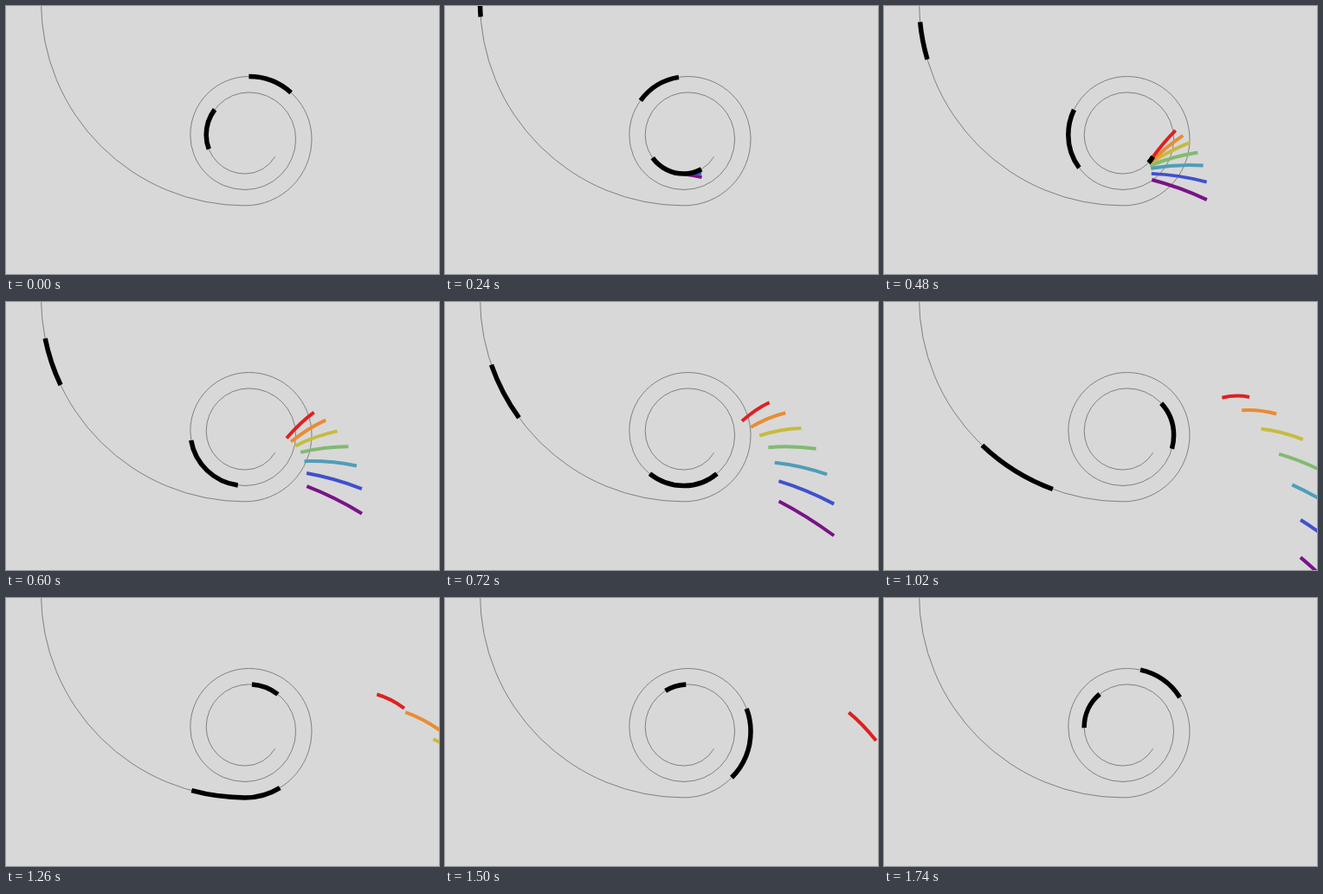
An HTML page with a canvas for the animation above (1800 ms loop, 500 px wide and 310 px high).

```html
<!DOCTYPE html>
<html lang="en">
<head>
<meta charset="utf-8">
<title>Spiral run</title>
<style>
  html, body { margin: 0; width: 100%; height: 100%; overflow: hidden; background: #d8d8d8; }
  canvas { display: block; }
</style>
</head>
<body>
<canvas width="500" height="310"></canvas>
<script>
const ctx = document.querySelector('canvas').getContext('2d');
const LOOP = 1800, TRAIL = 200, QUARTER = Math.PI / 2, GRAVITY = 0.000174;

// Quarter arcs: one wide entry curve, then a spiral turning round a small square
const arcs = [{ x: 276, y: -4.6, r: 235.5 }];
for (let i = 0; i < 9; i++) {
  arcs.push({
    x: [276, 280.6, 280.6, 276][i % 4],
    y: [153.9, 153.9, 149.3, 149.3][i % 4],
    r: 77 - 4.6 * i
  });
}
let total = 0;
for (const arc of arcs) {
  arc.from = total;
  total += arc.r * QUARTER;
}
const END = arcs[9].from + 41.8;

// Time and distance along the track
const knots = [
  [0, 0], [240, 17], [480, 67], [720, 147.5], [1020, 286.6], [1260, 411.8],
  [1540, 531.7], [1800, 604.5], [2040, 668], [2280, 751.2], [2520, 851.3],
  [2820, 942.6], [3060, 983.7], [3340, 1021.2], [3600, 1081.2], [3840, 1155.9],
  [3910, 1177]
];
const rise = i => (knots[i + 1][1] - knots[i][1]) / (knots[i + 1][0] - knots[i][0]);
const slopes = knots.map(([t], i) => {
  if (i === 0) return 0;
  if (i === knots.length - 1) return rise(i - 1);
  const before = t - knots[i - 1][0], after = knots[i + 1][0] - t;
  return (rise(i - 1) * after + rise(i) * before) / (before + after);
});

function distance(t) {
  if (t <= 0) return 0;
  const i = knots.findIndex(k => k[0] > t) - 1;
  if (i < 0) return END;
  const [t0, s0] = knots[i], [t1, s1] = knots[i + 1];
  const h = t1 - t0, u = (t - t0) / h, v = 1 - u;
  return s0 * v * v * (1 + 2 * u) + s1 * u * u * (3 - 2 * u)
    + h * u * v * (slopes[i] * v - slopes[i + 1] * u);
}

function strokeTrack(from, to, color, width) {
  to = Math.min(to, END);
  if (to <= from) return;
  ctx.beginPath();
  arcs.forEach(({ x, y, r, from: start }, i) => {
    const a = Math.max(from - start, 0), b = Math.min(to - start, r * QUARTER);
    const angle = Math.PI - i * QUARTER;
    if (b > a) ctx.arc(x, y, r, angle - a / r, angle - b / r, true);
  });
  stroke(color, width);
}

function stroke(color, width) {
  ctx.strokeStyle = color;
  ctx.lineWidth = width;
  ctx.stroke();
}

// Colour, launch time, then position and velocity at 480 ms
const sparks = [
  ['#781487', 178, 372.5, 224, 0.318, 0.15],
  ['#4050cf', 210, 372.3, 203.5, 0.319, 0.083],
  ['#509db8', 240, 368.3, 184.6, 0.302, 0.019],
  ['#82ba70', 255, 362, 169.6, 0.276, -0.041],
  ['#c6bb40', 290, 353.3, 158, 0.241, -0.092],
  ['#e98c33', 290, 345, 150, 0.2, -0.132],
  ['#df2020', 300, 336.5, 144, 0.158, -0.157]
];

function drawSpark([color, launch, x, y, vx, vy], t) {
  const from = Math.max(t - TRAIL, launch) - 480, to = t - 480;
  if (to <= from) return;
  const at = d => [x + vx * d, y + vy * d + GRAVITY * d * d];
  const mid = (from + to) / 2;
  ctx.beginPath();
  ctx.moveTo(...at(from));
  // Control point where the two end tangents meet
  ctx.quadraticCurveTo(x + vx * mid, y + vy * mid + GRAVITY * from * to, ...at(to));
  stroke(color, 4);
}

function draw(now) {
  const t = now % LOOP;
  ctx.fillStyle = '#d8d8d8';
  ctx.fillRect(0, 0, 500, 310);
  strokeTrack(0, END, '#777', 0.9);
  sparks.forEach(spark => drawSpark(spark, t));
  for (let lap = 0; lap < 3; lap++) {
    const age = t + lap * LOOP;
    strokeTrack(distance(age - TRAIL), distance(age), '#000', 5.5);
  }
}

const begin = performance.now();
function tick() {
  draw(performance.now() - begin);
  requestAnimationFrame(tick);
}
tick();
</script>
</body>
</html>
```
